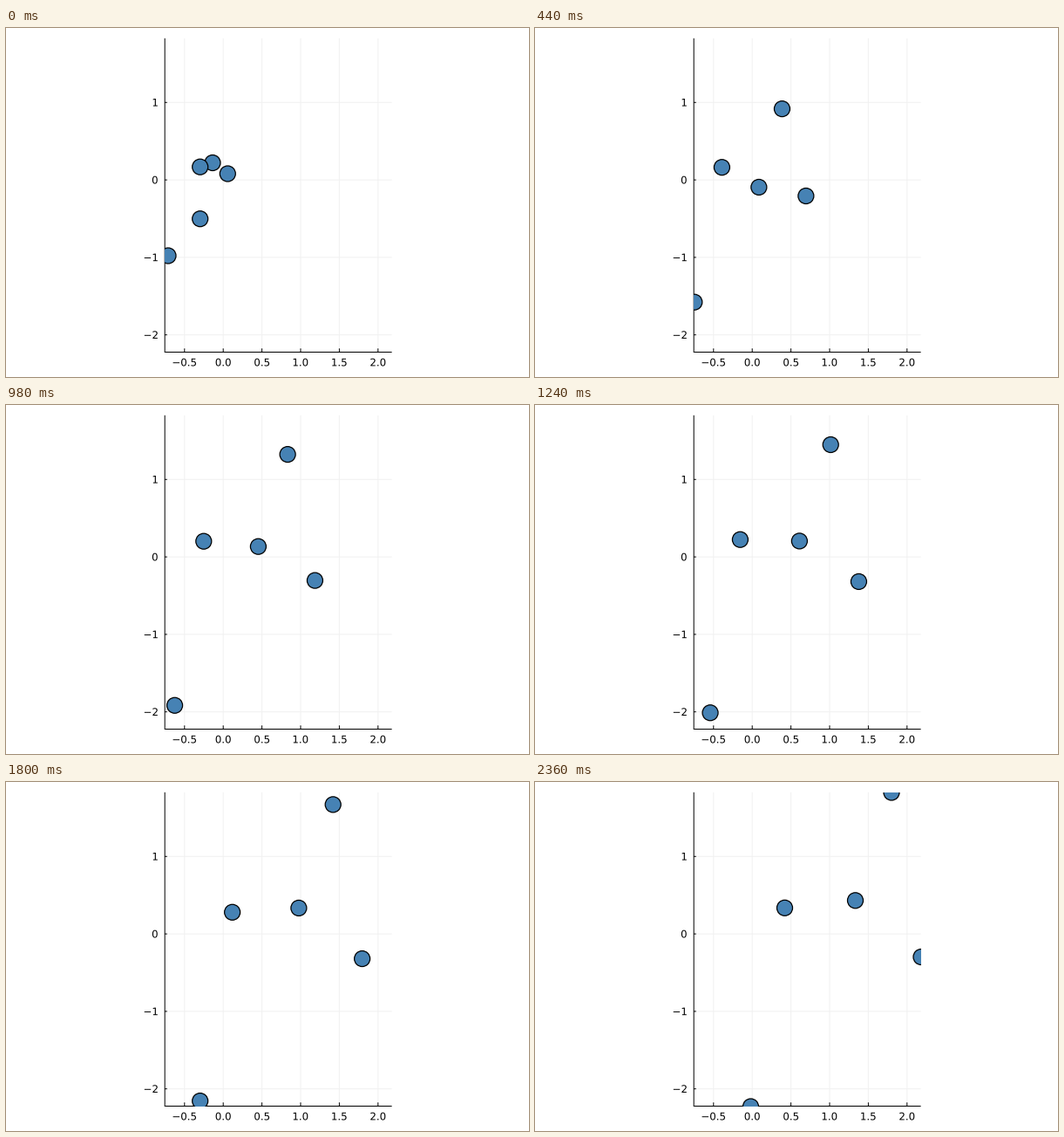
These frames come from a looping animation (600 by 400 pixels, 2460 ms). A matplotlib script:

```python
import numpy as np
import matplotlib.pyplot as plt
from matplotlib.animation import FuncAnimation
from matplotlib.patches import Circle, PathPatch, Rectangle
from matplotlib.textpath import TextPath
from matplotlib.transforms import Affine2D

plt.rcParams["font.family"] = "DejaVu Sans"

W, H, DPI = 600, 400, 100
PX = 72 / DPI                      # one pixel in points
LEFT, RIGHT, TOP, BOTTOM = 182, 442.6, 11.8, 371.8
UNIT, X0, Y0 = 88.8, 249.2, 174.1  # pixels per unit, origin
TEXT_SIZE = 11.8
GRID = "#f1f1f1"

# Bodies slow down towards a common drift; each passes three key points.
DRIFT = np.array([2.52, -0.384])
SLOWDOWN = 40
KEY_STEPS = np.array([0, 16, 50])
KEY_POINTS = [
    [(237, 154.5), (306, 70.5), (409, 12)],
    [(222.7, 159.2), (219.7, 158), (286.5, 144.3)],
    [(254.3, 167), (336, 198.5), (443, 200.5)],
    [(222.7, 218.7), (275, 170), (367.5, 135.8)],
    [(186, 261), (187.5, 333), (247.5, 372)],
]


def fade(step):
    return (1 + step / SLOWDOWN) ** -2


def fit(points):
    """Quadratic in the fade, measured in the drifting frame."""
    rel = np.array(points) - np.outer(KEY_STEPS, DRIFT)
    return np.polyfit(fade(KEY_STEPS), rel, 2)


def position(curve, step):
    s = fade(step)
    return np.array([s * s, s, 1]) @ curve + step * DRIFT


def step_at(tick):
    """Steps advance in threes every 140 ms, the middle one held for 100 ms."""
    group, part = divmod(tick, 7)
    offset = 0 if part == 0 else 1 if part < 6 else 2
    return min(3 * group + offset, KEY_STEPS[-1])


fig = plt.figure(figsize=(W / DPI, H / DPI), dpi=DPI, facecolor="white")
ax = fig.add_axes([0, 0, 1, 1])
ax.set_xlim(0, W)
ax.set_ylim(H, 0)
ax.axis("off")


def line(xs, ys, color="black", z=2):
    ax.plot(xs, ys, color=color, lw=PX, zorder=z, snap=False,
            solid_capstyle="butt")


def label(x, baseline, text, align):
    """Text outline; align 0.5 centres it on x, align 1 ends it there."""
    path = TextPath((0, 0), text.replace("-", "\u2212"), size=TEXT_SIZE)
    box = path.get_extents()
    shift = box.x0 + align * box.width
    place = Affine2D().translate(-shift, 0).scale(1, -1).translate(x, baseline)
    ax.add_patch(PathPatch(place.transform_path(path), fc="black", lw=0,
                           snap=False))


for v in np.arange(-0.5, 2.1, 0.5):
    x = X0 + v * UNIT
    line([x, x], [TOP, BOTTOM], GRID, 1)
    line([x, x], [BOTTOM - 4.5, BOTTOM])
    label(x, 387.4, f"{v:.1f}", 0.5)

for v in range(-2, 2):
    y = Y0 - v * UNIT
    line([LEFT, RIGHT], [y, y], GRID, 1)
    line([LEFT, LEFT + 2.8], [y, y])
    label(173.8, y + 0.365 * TEXT_SIZE, str(v), 1)

line([LEFT + 0.2] * 2, [TOP, BOTTOM])
line([LEFT, RIGHT], [BOTTOM - 0.3] * 2)

window = Rectangle((LEFT, TOP), RIGHT - LEFT, BOTTOM - TOP,
                   transform=ax.transData)
curves = [fit(points) for points in KEY_POINTS]
bodies = []
for curve in curves:
    body = Circle(position(curve, 0), 9, fc="steelblue", ec="black",
                  lw=1.25 * PX, zorder=3)
    ax.add_patch(body)
    body.set_clip_path(window)
    bodies.append(body)


def update(tick):
    step = step_at(tick)
    for body, curve in zip(bodies, curves):
        body.center = position(curve, step)
    return bodies


anim = FuncAnimation(fig, update, frames=123, interval=20,
                     repeat=True, repeat_delay=0)
plt.show()
```
